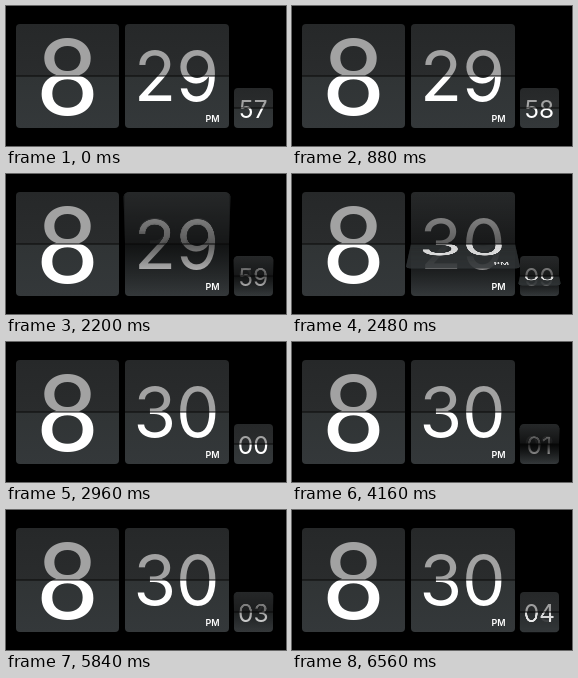
An HTML page with a canvas that plays this animation: 280x140 px, repeating every 6.6 s.

```html
<!DOCTYPE html>
<html lang="en">
<head>
<meta charset="utf-8">
<title>Flip clock</title>
<style>
  html, body { margin: 0; width: 100%; height: 100%; overflow: hidden; background: #000; }
  canvas { display: block; width: 280px; height: 140px; }
</style>
</head>
<body>
<canvas id="stage"></canvas>
<script>
const LOOP = 6600, STEP = 40, SHARP = 3;
const canvas = document.getElementById('stage');
const ctx = canvas.getContext('2d');
const dpr = window.devicePixelRatio || 1;
canvas.width = 280 * dpr;
canvas.height = 140 * dpr;

const hours = { x: 10, y: 18, w: 103, h: 104, font: '500 106px Lato', center: 61.5, base: 109 };
const minutes = { x: 119, y: 18, w: 104, h: 104, font: '400 69px Inter', center: 170.5, base: 95.3, mark: 'PM' };
const seconds = { x: 228, y: 82, w: 39, h: 40, font: '400 24.5px Inter', center: 247.3, base: 111.8 };

// Start time of each flip and the value it brings.
const secondFlips = [[0, '58'], [960, '59'], [2000, '00'], [3000, '01'], [3880, '02'], [4760, '03'], [5720, '04']];
const minuteFlips = [[2000, '30']];

// Flap angle in degrees by time since the flip began.
const swing = [[0, 0], [40, 3], [280, 24], [360, 42], [440, 94], [480, 115], [720, 148], [860, 180]];

function ramp(table, t) {
  for (let i = 1; i < table.length; i++) {
    const [t0, v0] = table[i - 1], [t1, v1] = table[i];
    if (t < t1) return v0 + (v1 - v0) * (t - t0) / (t1 - t0);
  }
  return table[table.length - 1][1];
}

// Draws one half of a card at rest; the shade is deepest at the hinge.
function drawHalf(c, card, text, isTop, shade = 0) {
  const { x, y, w, h } = card, mid = y + h / 2;
  const y0 = isTop ? y : mid;
  const edge = isTop ? y : y + h;
  const paint = (from, to) => {
    const fill = c.createLinearGradient(0, mid, 0, edge);
    fill.addColorStop(0, from);
    fill.addColorStop(1, to);
    c.fillStyle = fill;
    c.beginPath();
    c.roundRect(x, y, w, h, 4);
    c.fill();
  };
  c.save();
  c.beginPath();
  c.rect(x, y0, w, h / 2);
  c.clip();
  if (isTop) paint('#2a2c2d', '#262829');
  else paint('#303435', '#34383a');
  c.textAlign = 'center';
  c.font = card.font + ', sans-serif';
  c.fillStyle = isTop ? '#a2a2a2' : '#fff';
  c.fillText(text, card.center, card.base);
  if (shade > 0) paint(`rgba(0,0,0,${shade})`, 'rgba(0,0,0,0)');
  if (card.mark && !isTop) {
    c.font = '600 9px Inter, sans-serif';
    c.fillStyle = '#fff';
    c.fillText(card.mark, x + w - 16.5, y + h - 6);
  }
  c.restore();
}

const sheet = document.createElement('canvas');
const sheetCtx = sheet.getContext('2d');

// Projects a half card turned about the hinge, one thin row at a time.
function drawFlap(card, text, angle, shade) {
  const isTop = angle < 90, half = card.h / 2, a = angle * Math.PI / 180;
  const mid = card.y + half, depth = half * 9.7;
  sheet.width = card.w * SHARP;
  sheet.height = half * SHARP;
  sheetCtx.setTransform(SHARP, 0, 0, SHARP, -card.x * SHARP, -(isTop ? card.y : mid) * SHARP);
  drawHalf(sheetCtx, card, text, isTop, shade);

  const zoom = r => depth / (depth - r * Math.sin(a));
  const place = r => mid - r * Math.cos(a) * zoom(r);
  const rows = half * 2;
  for (let i = 0; i < rows; i++) {
    const r0 = i / 2, r1 = r0 + 0.5;
    const from = Math.min(place(r0), place(r1));
    const tall = Math.abs(place(r1) - place(r0));
    const wide = card.w * zoom(r0 + 0.25);
    const sy = (isTop ? half - r1 : r0) * SHARP;
    ctx.drawImage(sheet, 0, sy, sheet.width, SHARP / 2,
      card.x + (card.w - wide) / 2, from, wide, tall + 0.12);
  }
}

function drawHinge(card) {
  ctx.fillStyle = '#080808';
  ctx.fillRect(card.x, card.y + card.h / 2 - 0.5, card.w, 1);
}

function drawCard(card, first, flips, t) {
  let before = first, now = first, age = Infinity;
  for (const [start, value] of flips) {
    if (t < start) break;
    before = now;
    now = value;
    age = t - start;
  }
  const angle = ramp(swing, age);
  if (angle <= 0 || angle >= 180) {
    const text = angle <= 0 ? before : now;
    drawHalf(ctx, card, text, true);
    drawHalf(ctx, card, text, false);
  } else {
    const dim = Math.min(1, age / 280);
    drawHalf(ctx, card, now, true, 0.6 * Math.min(1, (180 - angle) / 90));
    drawHalf(ctx, card, before, false, 0.9 * dim);
    if (angle < 90) drawFlap(card, before, angle, 0.6 * dim);
    else drawFlap(card, now, angle, 0);
  }
  drawHinge(card);
}

function draw(t) {
  ctx.setTransform(dpr, 0, 0, dpr, 0, 0);
  ctx.fillStyle = '#000';
  ctx.fillRect(0, 0, 280, 140);
  drawCard(hours, '8', [], t);
  drawCard(minutes, '29', minuteFlips, t);
  drawCard(seconds, '57', secondFlips, t);
}

const origin = performance.now();
function tick() {
  const t = (performance.now() - origin) % LOOP;
  draw(Math.floor(t / STEP) * STEP);
  requestAnimationFrame(tick);
}
tick();
</script>
</body>
</html>
```
